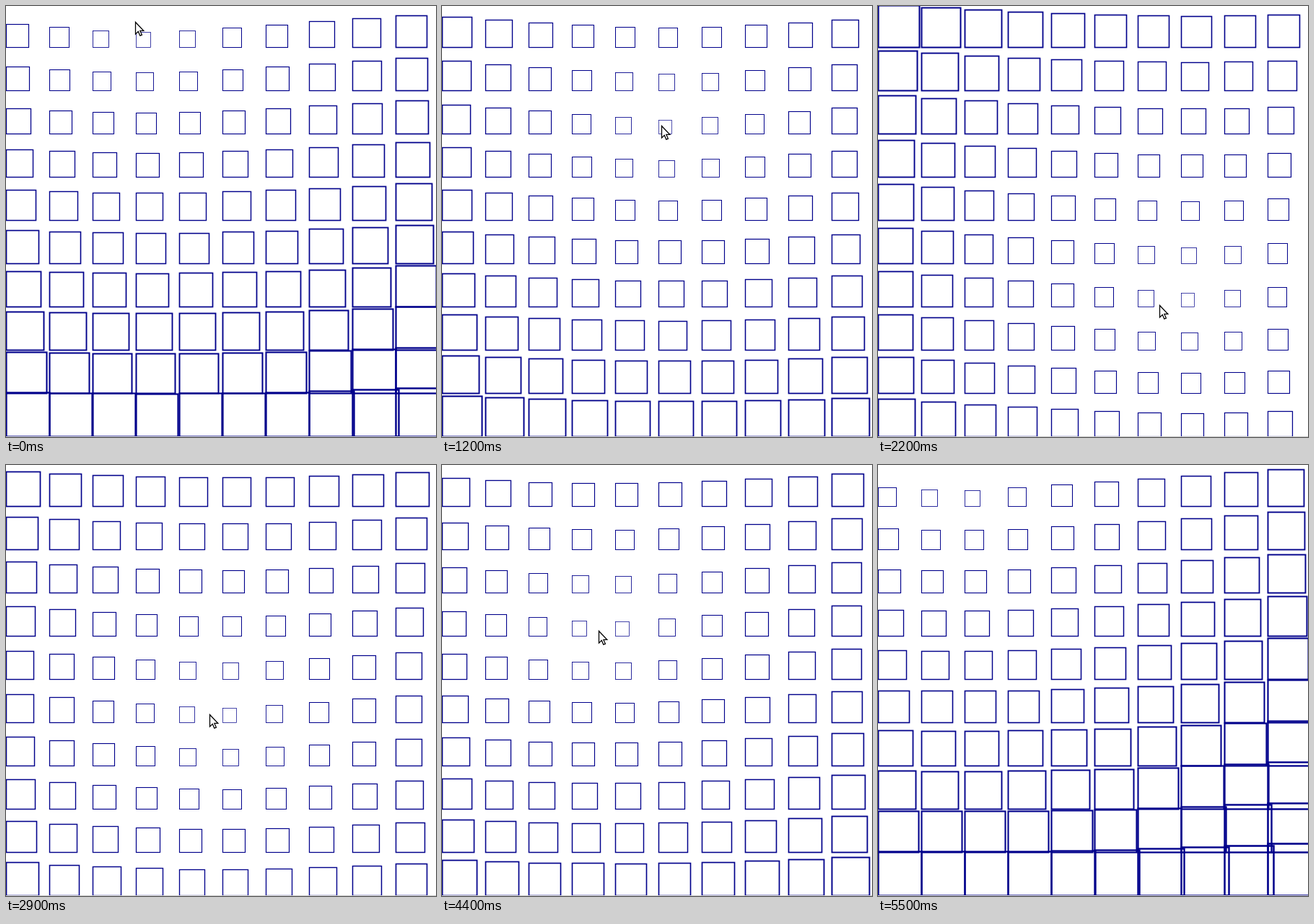
An HTML page with a canvas for the animation above (5.6 s loop, 596 px wide and 598 px high).

```html
<!DOCTYPE html>
<html lang="en">
<head>
<meta charset="utf-8">
<title>Squares following the pointer</title>
<style>
  html, body { margin: 0; height: 100%; overflow: hidden; background: #fff; }
  canvas { display: block; }
</style>
</head>
<body>
<canvas id="stage" width="596" height="598"></canvas>
<script>
const ctx = document.getElementById('stage').getContext('2d');
const LOOP = 5600, CELL = 60, COUNT = 10, FLOOR = 597;

// Turning points of the pointer: time in ms, x, y
const path = [
  [200, 179, 22], [700, 253, 162], [1400, 335, 165], [1700, 445, 192],
  [2000, 485, 310], [2200, 390, 415], [2400, 288, 395], [2900, 282, 346],
  [3300, 120, 400], [3700, 159, 403], [4400, 217, 230], [5200, 92, 40], [5500, 90, 2]
];
const keyAt = i => path[Math.max(0, Math.min(path.length - 1, i))];

// The picture advances in hard steps: every 100 ms, later mostly every 200 ms
function stepTime(t) {
  if (t >= 2400 && t < 2900) return 2400;
  if (t >= 3300 && t < 4300) return t - (t - 3300) % 200;
  if (t >= 4400 && t < 5400) return t - (t - 4400) % 200;
  return t - t % 100;
}

// Smooth curve through the turning points
function pointerAt(time) {
  const t = Math.max(path[0][0], Math.min(keyAt(Infinity)[0], time));
  const i = Math.max(1, path.findIndex(key => key[0] >= t));
  const [before, from, to, after] = [i - 2, i - 1, i, i + 1].map(keyAt);
  const span = to[0] - from[0], k = (t - from[0]) / span;
  return [1, 2].map(axis => {
    const slope = (a, b) => (b[axis] - a[axis]) / (b[0] - a[0]) * span;
    const ease = k * k * (3 - 2 * k);
    return from[axis] + (to[axis] - from[axis]) * ease
      + slope(before, to) * k * (1 - k) ** 2
      - slope(from, after) * k * k * (1 - k);
  });
}

function drawSquares(px, py) {
  ctx.strokeStyle = '#00008b';
  for (let row = 0; row < COUNT; row++) {
    for (let col = 0; col < COUNT; col++) {
      const x = col * CELL, y = row * CELL + 57;
      const size = 18 + 0.072 * Math.hypot(x - px, y - py);
      const top = Math.floor(y - size);
      ctx.lineWidth = size / 27;
      ctx.strokeRect(x + 0.5, top + 0.5, Math.floor(size), y - top);
    }
  }
}

const arrow = new Path2D('M.5 .5V17L4.3 13.4 6.8 19.2 9.4 18.1 6.9 12.4H11.8Z');

function drawPointer(x, y) {
  ctx.save();
  ctx.translate(Math.round(x), Math.round(y));
  ctx.fillStyle = '#fff';
  ctx.strokeStyle = '#000';
  ctx.lineWidth = 1.3;
  ctx.fill(arrow);
  ctx.stroke(arrow);
  ctx.restore();
}

function draw(now) {
  const t = stepTime(now % LOOP);
  const lag = t < 2400 ? 50 : 0; // squares trail the first fast sweep
  const [aimX, aimY] = pointerAt(t - lag);
  ctx.fillStyle = '#fff';
  ctx.fillRect(0, 0, 596, 598);
  drawSquares(aimX + 3, aimY + 7);
  if (t < 5500) drawPointer(...pointerAt(t));
  ctx.fillStyle = '#ccc';
  ctx.fillRect(0, FLOOR, 596, 1);
}

const start = performance.now();
function tick() {
  draw(performance.now() - start);
  requestAnimationFrame(tick);
}
tick();
</script>
</body>
</html>
```
